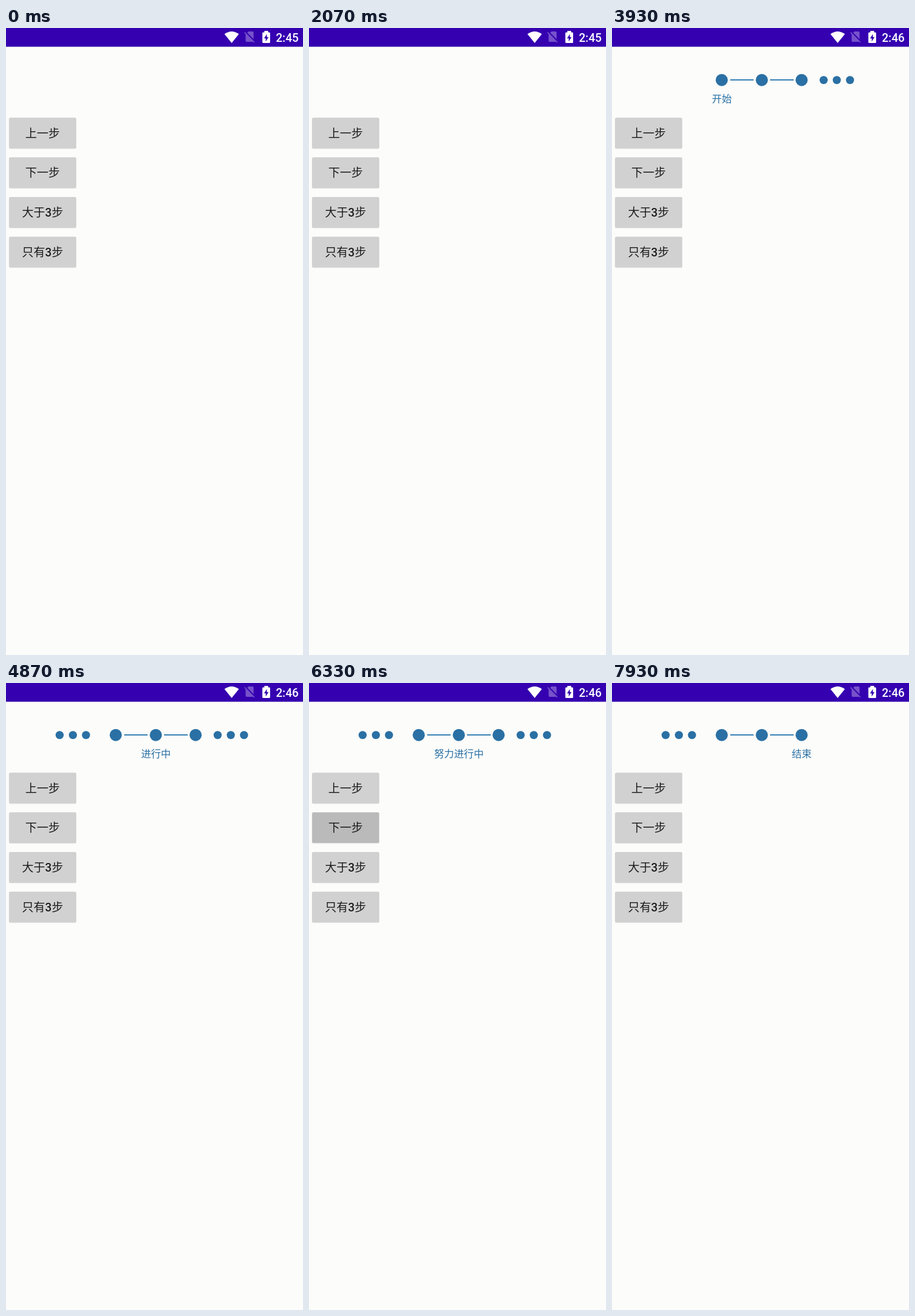
An HTML page for the animation above (8 s loop, 515x1087 px).

```html
<!DOCTYPE html>
<html lang="zh-CN">
<head>
<meta charset="utf-8">
<style>
  html, body { margin: 0; width: 100%; height: 100%; overflow: hidden; background: #fcfcfa; }
  svg { display: block; width: 515px; height: 1087px; }
  text { font-family: Roboto, "Noto Sans CJK SC", "Noto Sans CJK", sans-serif; }
  .button rect { fill: #d1d1d1; }
  .button .shadow { fill: #000; opacity: .14; }
  .button .ripple { fill: #000; opacity: 0; }
  .button text { font-size: 20px; text-anchor: middle; fill: #1c1c1c; }
  .digit, #clock { font-weight: 500; }
  #clock { font-size: 20px; fill: #fff; }
  #steps { fill: #2a70a4; }
  #label { font-size: 17.2px; text-anchor: middle; }
</style>
</head>
<body>
<svg viewBox="0 0 515 1087">
  <rect width="515" height="1087" fill="#fcfcfa"/>
  <rect width="515" height="32.5" fill="#3500b0"/>
  <path d="M391.3 26 378.8 10.5Q391.3 1.5 403.8 10.5Z" fill="#fff"/>
  <g fill="#7652ca">
    <path d="M420.5 6H427.5Q429.3 6 429.3 8V19.3L418.2 8.3Z"/>
    <path d="M414.3 7 431.2 24.2 430 25.4 428 23.6Q427.5 24 426.5 24H417.5Q415.5 24 415.5 22V10.8L413 8.2Z"/>
  </g>
  <path d="M448 5H454.5V7.5H456.5Q458 7.5 458 9V24.5Q458 26 456.5 26H446Q444.5 26 444.5 24.5V9Q444.5 7.5 446 7.5H448Z" fill="#fff"/>
  <path d="M452.3 10.5 447.5 18H450.4V23.5L455.2 15.8H452.3Z" fill="#3500b0"/>
  <text id="clock" x="468" y="24"></text>
  <g id="steps">
    <g id="before"></g>
    <g id="middle"></g>
    <g id="after"></g>
    <path d="M205 90H245.5M274 90H315" stroke="#2f7bb1" stroke-width="2"/>
    <text id="label" y="128.6"></text>
  </g>
  <g id="buttons"></g>
</svg>
<script>
const LOOP = 8000;
const CLOCK_TICK = 2900;
const NEXT = 1, MANY = 2;
const stages = [
  { at: 3470, label: "开始", x: 190.5, before: false, after: true },
  { at: 4500, label: "进行中", x: 260, before: true, after: true },
  { at: 6220, label: "努力进行中", x: 260, before: true, after: true },
  { at: 7500, label: "结束", x: 329, before: true, after: false }
];
const presses = stages.map((stage, i) => ({ button: i ? NEXT : MANY, release: stage.at }));
const byId = id => document.getElementById(id);

function addDots(id, centers, radius) {
  byId(id).innerHTML = centers.map(x => `<circle cx="${x}" cy="90.2" r="${radius}"/>`).join("");
}
addDots("before", [93, 116, 138.7], 7);
addDots("middle", [190.3, 259.8, 328.8], 10.5);
addDots("after", [367, 389.8, 412.7], 7);

byId("buttons").innerHTML = ["上一步", "下一步", "大于3步", "只有3步"].map((name, i) => `
  <g class="button" transform="translate(5.5 ${155.5 + i * 68.75})">
    <rect class="shadow" x="-.4" y=".3" width="116.8" height="53.8" rx="2.5"/>
    <rect width="116" height="52.7" rx="2"/>
    <rect class="ripple" width="116" height="52.7" rx="2"/>
    <text x="58" y="34.1">${name.replace("3", '<tspan class="digit">3</tspan>')}</text>
  </g>`).join("");
const ripples = [...document.querySelectorAll(".ripple")];

const clamp = v => Math.min(1, Math.max(0, v));

// Fades in under the finger, stays briefly after release, then fades out.
function pressAmount(t, release) {
  return Math.min(clamp((t - release + 90) / 80), clamp((release + 300 - t) / 150));
}

function render(t) {
  byId("clock").textContent = t < CLOCK_TICK ? "2:45" : "2:46";
  const stage = stages.filter(s => t >= s.at).pop();
  const show = (id, visible) => byId(id).setAttribute("visibility", visible ? "inherit" : "hidden");
  show("steps", stage);
  if (stage) {
    show("before", stage.before);
    show("after", stage.after);
    byId("label").textContent = stage.label;
    byId("label").setAttribute("x", stage.x);
  }
  ripples.forEach((ripple, i) => {
    const amounts = presses.filter(p => p.button === i).map(p => pressAmount(t, p.release));
    ripple.style.opacity = 0.11 * Math.max(0, ...amounts);
  });
}

const start = performance.now();
function frame() {
  render((performance.now() - start) % LOOP);
  requestAnimationFrame(frame);
}
frame();
</script>
</body>
</html>
```
